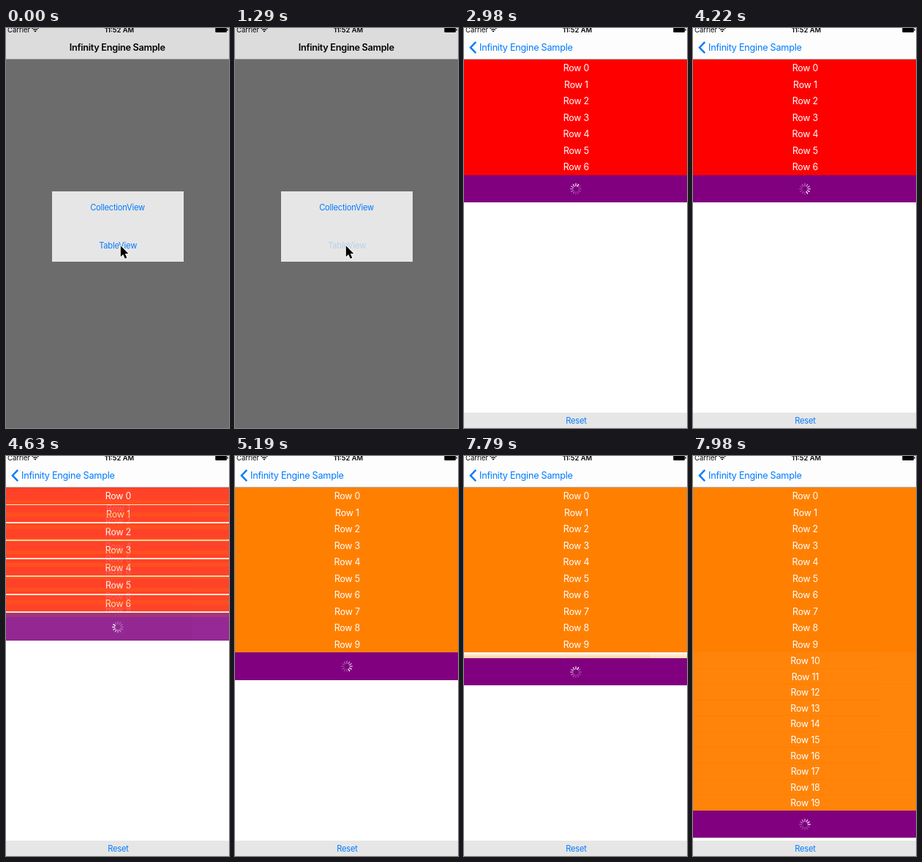
An HTML page for the animation above (8 s loop, 305 px wide and 546 px high).

```html
<!DOCTYPE html>
<html lang="en">
<head>
<meta charset="utf-8">
<title>Table view loading</title>
<style>
  html, body { margin: 0; width: 100%; height: 100%; overflow: hidden; background: #fff; }
  svg { display: block; width: 305px; height: 546px; font-family: Inter, Roboto, sans-serif; }
  .row { font-size: 12.4px; letter-spacing: -.2px; fill: #fff; text-anchor: middle; }
  .link { font-size: 11.1px; letter-spacing: -.2px; fill: #007aff; text-anchor: middle; }
  .title { font-size: 12.7px; font-weight: 600; letter-spacing: -.28px; }
  .back { font-size: 12.7px; letter-spacing: -.26px; fill: #007aff; }
  #menu rect, #page rect { shape-rendering: crispEdges; }
</style>
</head>
<body>
<svg viewBox="0 0 305 546">
  <g id="menu">
    <rect width="400" height="546" fill="#6c6c6c"/>
    <rect x="63" y="223" width="180" height="96" fill="#e6e6e6"/>
    <text class="link" x="152.6" y="249">CollectionView</text>
    <text class="link" id="tableLink" x="153.1" y="301.3">TableView</text>
  </g>
  <rect id="dim" width="305" height="546"/>
  <g id="page">
    <rect width="305" height="546" fill="#fff"/>
    <g id="cells"></g>
    <rect y="525" width="305" height="21" fill="#e6e6e6"/>
    <text class="link" x="153.4" y="540">Reset</text>
  </g>
  <rect id="bar" width="305" height="43"/>
  <rect y="42" width="305" height="1" opacity=".28"/>
  <text class="title" id="title" y="31.2">Infinity Engine Sample</text>
  <g id="back">
    <path d="M16.2 19.2L8.9 26.7L16.2 34.2" fill="none" stroke="#007aff" stroke-width="2.4"/>
  </g>
  <text class="back" id="backText" y="31.2">Infinity Engine Sample</text>
  <g id="status">
    <text x="2" y="6.2" font-size="9.5">Carrier</text>
    <text x="155" y="6.2" font-size="9.3" font-weight="600" text-anchor="middle">11:52 AM</text>
    <path d="M35.5 .9Q40 -2.6 44.5 .9M37.2 2.7Q40 .6 42.8 2.7" fill="none" stroke="#000" stroke-width="1.2"/>
    <path d="M38.3 4L40 5.8L41.7 4Q40 2.8 38.3 4Z"/>
    <rect x="286.3" y="-1" width="15.6" height="7" rx="1"/>
    <rect x="302.4" y="1" width="1.2" height="3" rx=".5"/>
  </g>
  <path id="cursor" d="M.8 .3V15.2L4.2 12L6.7 17.8L9.3 16.7L6.8 11H11.4Z"
    fill="#000" stroke="#fff" stroke-width="1.8" stroke-linejoin="round" paint-order="stroke"/>
</svg>
<script>
const LOOP = 8000, WIDTH = 305, TOP = 43, ROW = 22.5, MID = 153.4;
const PUSH = 1570, RELOAD = 4549, APPEND = 7756.5, SLIDE = 262;
const TICK = 81.3;

const $ = id => document.getElementById(id);
const clamp = v => Math.max(0, Math.min(1, v));
const mix = (a, b, p) => a + (b - a) * p;

function make(parent, tag, attrs, text) {
  const el = document.createElementNS("http://www.w3.org/2000/svg", tag);
  set(el, attrs);
  if (text) el.textContent = text;
  return parent.appendChild(el);
}
function set(el, attrs) {
  for (const key in attrs) el.setAttribute(key, attrs[key]);
}
function place(el, x, y, opacity = 1) {
  set(el, { transform: `translate(${x} ${y})`, opacity });
}

function makeRows(first, count, fill) {
  return Array.from({ length: count }, (_, i) => {
    const g = make($("cells"), "g", {});
    make(g, "rect", { width: WIDTH, height: ROW, fill });
    make(g, "text", { class: "row", x: MID, y: 16.1 }, "Row " + (first + i));
    return g;
  });
}
function makeLoader() {
  const cell = make($("cells"), "g", {});
  make(cell, "rect", { width: WIDTH, height: 37.5, fill: "#800080" });
  const spokes = Array.from({ length: 12 }, (_, i) => make(cell, "line", {
    y1: -4.2, y2: -7.3, stroke: "#fff", "stroke-width": 1.3, "stroke-linecap": "round",
    transform: `translate(153 19.2) rotate(${i * 30})`
  }));
  return { cell, spokes };
}
function placeRows(rows, top, step, opacity) {
  rows.forEach((row, i) => place(row, 0, top + i * step, opacity));
}
function placeLoader(loader, y, opacity, head) {
  place(loader.cell, 0, y, opacity);
  loader.spokes.forEach((spoke, i) => {
    const age = (((head - i) % 12) + 12) % 12;
    spoke.setAttribute("opacity", Math.max(.25, 1 - age * .11));
  });
}

// Standard ease-in-out, cubic-bezier(.42, 0, .58, 1)
function ease(x) {
  let lo = 0, hi = 1;
  for (let i = 0; i < 24; i++) {
    const s = (lo + hi) / 2, r = 1 - s;
    if (1.26 * s * r * r + 1.74 * s * s * r + s * s * s < x) lo = s; else hi = s;
  }
  return x >= 1 ? 1 : x <= 0 ? 0 : lo * lo * (3 - 2 * lo);
}
// Critically damped spring for the page push
function spring(ms) {
  if (ms <= 0) return 0;
  const x = ms * .0175;
  return x > 9 ? 1 : 1 - (1 + x) * Math.exp(-x);
}

const redRows = makeRows(0, 7, "#ff0000");
const oldLoader = makeLoader();
const orangeRows = makeRows(0, 10, "#ff8000");
const moreRows = makeRows(10, 10, "#ff8000");
const newLoader = makeLoader();

function drawPush(t) {
  const p = spring(t - PUSH);
  place($("menu"), -.306 * WIDTH * p, 0);
  place($("page"), WIDTH * (1 - p), 0);
  set($("dim"), { opacity: .1 * p });
  const grey = Math.round(mix(220, 253, p));
  set($("bar"), { fill: `rgb(${grey},${grey},${grey})` });

  const shown = p ** 7;
  set($("title"), { x: mix(86.8, 24, p), opacity: 1 - p });
  set($("backText"), { x: mix(86.8, 21, p) + 2 * (1 - shown), opacity: shown });
  set($("back"), { opacity: shown });

  const pressed = t >= 1290 ? mix(.2, 1, clamp((t - 1560) / 300)) : 1;
  set($("tableLink"), { opacity: pressed });
}

function drawCells(t) {
  const a = ease((t - RELOAD) / SLIDE), b = ease((t - APPEND) / SLIDE);
  const height = mix(7, 10, a) * ROW;
  const loaderY = TOP + height + 10 * ROW * b;
  const head = Math.floor((t - 2420) / TICK) - 5;
  placeRows(redRows, TOP, height / 7, 1 - a);
  placeRows(orangeRows, TOP, height / 10, a);
  placeRows(moreRows, TOP + height, ROW * b, b);
  placeLoader(oldLoader, loaderY, 1 - a, head);
  placeLoader(newLoader, loaderY, a, head);
}

function draw(t) {
  drawPush(t);
  drawCells(t);
  const x = t < 540 ? 156 : t < 600 ? 153 : 151;
  place($("cursor"), x, 297, t < 2100 ? 1 : 0);
}

const start = performance.now();
function loop() {
  draw((performance.now() - start) % LOOP);
  requestAnimationFrame(loop);
}
draw(0);
requestAnimationFrame(loop);
</script>
</body>
</html>
```
